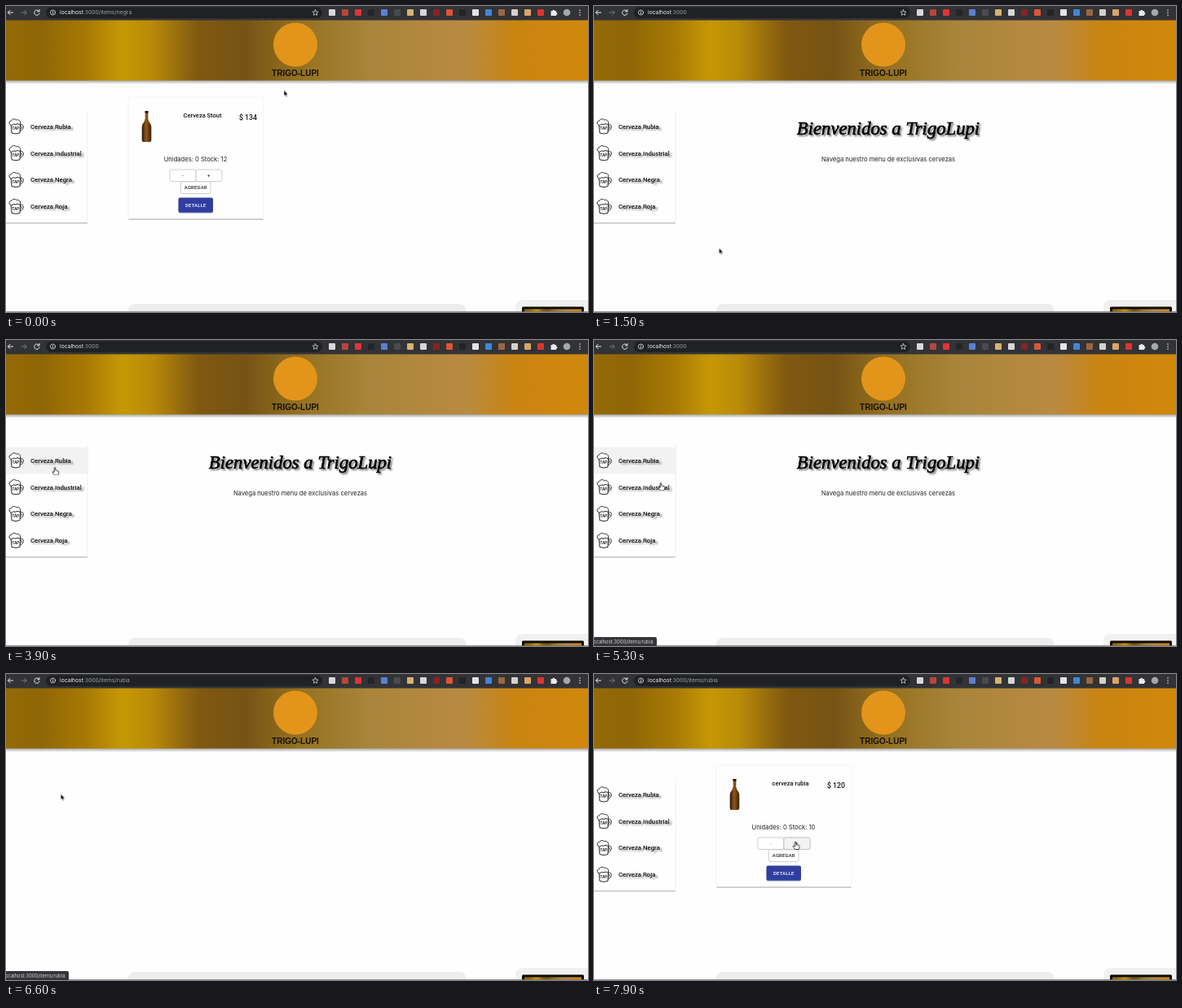
An HTML page that plays this animation: 714 by 376 pixels, repeating every 8 s.

```html
<!DOCTYPE html>
<html lang="es">
<head>
<meta charset="utf-8">
<title>TrigoLupi</title>
<style>
  html, body { margin: 0; width: 100%; height: 100%; overflow: hidden; background: #fefefe; }
  svg { display: block; width: 714px; height: 376px; }
  text { font-family: Inter, "Open Sans", sans-serif; font-size: 7.6px; fill: #222; }
  .mid { text-anchor: middle; }
  .url { font-size: 6.76px; fill: #9aa0a6; }
  .url .host { fill: #f1f3f4; }
  .item, .name, .price, .btn { font-family: Roboto, sans-serif; font-weight: 500; }
  .item { font-size: 7.75px; fill: #111; text-shadow: 3px 2px 2px rgba(0, 0, 0, .42); }
  .name { font-size: 7.5px; fill: #111; }
  .price { font-size: 8.7px; fill: #111; }
  .btn { font-size: 5.9px; letter-spacing: .2px; }
  .title {
    font: italic 22.7px "Liberation Serif", "Noto Serif", serif;
    fill: #000; stroke: #000; stroke-width: .7px;
    text-shadow: 2px 2px 2px rgba(0, 0, 0, .4);
  }
  .brand { font: bold 10px "Liberation Sans", sans-serif; fill: #17120a; }
  .status { font-size: 5.9px; fill: #cfd1d4; }
  .line { fill: none; stroke: #111; stroke-width: .9; stroke-linejoin: round; stroke-linecap: round; }
  .ui { fill: none; stroke: #e8eaed; stroke-width: 1; stroke-linecap: round; }
  .box { fill: #fff; stroke: #b9b9b9; stroke-width: .7; }

  .negra, .home, .rubia, .rubiaUrl, .menu, .hover, .statusBar, .plusHover, .arrow, .hand {
    animation: 8s step-end infinite;
  }
  .negra { animation-name: negra; }
  .home { animation-name: home; }
  .rubia { animation-name: rubia; }
  .rubiaUrl { animation-name: rubiaUrl; }
  .menu { animation-name: menu; }
  .hover { animation-name: hover; }
  .statusBar { animation-name: status; }
  .plusHover { animation-name: plusHover; }
  .arrow { animation-name: arrow; }
  .hand { animation-name: hand; }
  .cursor { animation: move 8s ease-in-out infinite; }

  @keyframes negra { 0% { opacity: 1 } 6.25%, 100% { opacity: 0 } }
  @keyframes home { 0% { opacity: 0 } 6.25% { opacity: 1 } 80%, 100% { opacity: 0 } }
  @keyframes rubia { 0% { opacity: 0 } 86.25%, 100% { opacity: 1 } }
  @keyframes rubiaUrl { 0% { opacity: 0 } 80%, 100% { opacity: 1 } }
  @keyframes menu { 0% { opacity: 1 } 80% { opacity: 0 } 86.25%, 100% { opacity: 1 } }
  @keyframes hover { 0% { opacity: 0 } 32.5% { opacity: 1 } 80%, 100% { opacity: 0 } }
  @keyframes status { 0% { opacity: 0 } 62.5% { opacity: 1 } 91.25%, 100% { opacity: 0 } }
  @keyframes plusHover { 0% { opacity: 0 } 95%, 100% { opacity: 1 } }
  @keyframes hand {
    0% { opacity: 0 } 4% { opacity: 1 } 7.5% { opacity: 0 } 32% { opacity: 1 }
    80% { opacity: 0 } 95%, 100% { opacity: 1 }
  }
  @keyframes arrow {
    0% { opacity: 1 } 4% { opacity: 0 } 7.5% { opacity: 1 } 32% { opacity: 0 }
    80% { opacity: 1 } 95%, 100% { opacity: 0 }
  }
  @keyframes move {
    0% { transform: translate(341px, 103.5px) }
    5%, 6.5% { transform: translate(350px, 62px) }
    16%, 24% { transform: translate(153.5px, 297.5px) }
    32.5%, 62.5% { transform: translate(60px, 156.5px) }
    66%, 68% { transform: translate(82px, 175.5px) }
    74%, 86.25% { transform: translate(67.3px, 147.5px) }
    96%, 100% { transform: translate(247.3px, 206px) }
  }
</style>
</head>
<body>
<svg viewBox="0 0 714 376">
  <defs>
    <linearGradient id="gold">
      <stop offset="0" stop-color="#946a06"/>
      <stop offset=".06" stop-color="#8f6606"/>
      <stop offset=".14" stop-color="#a87a04"/>
      <stop offset=".2" stop-color="#c69805"/>
      <stop offset=".25" stop-color="#b98a08"/>
      <stop offset=".33" stop-color="#80590f"/>
      <stop offset=".41" stop-color="#765315"/>
      <stop offset=".5" stop-color="#94701f"/>
      <stop offset=".62" stop-color="#a8843a"/>
      <stop offset=".79" stop-color="#b98a42"/>
      <stop offset=".87" stop-color="#c98412"/>
      <stop offset="1" stop-color="#d1880a"/>
    </linearGradient>
    <linearGradient id="drop" x2="0" y2="1">
      <stop offset="0" stop-color="#000" stop-opacity=".38"/>
      <stop offset="1" stop-color="#000" stop-opacity="0"/>
    </linearGradient>
    <linearGradient id="glass">
      <stop offset="0" stop-color="#2c1606"/>
      <stop offset=".45" stop-color="#94591a"/>
      <stop offset="1" stop-color="#3a1d08"/>
    </linearGradient>
    <g id="mug" class="line">
      <path fill="#fff" d="M-6-3L-5 8Q0 10 5 8L5.500-3Z"/>
      <path d="M5.500-2C10.500-4 11 4 5.300 5.500M5.500 0C8-1 8 3 5.300 3.300"/>
      <path fill="#fff" d="M-6-1.500C-9-3-8.500-7-5.500-6.800C-4.500-9.500-1-9.800 .5-8C3.500-9 6.500-6.500 5.500-3C4-1.500 3-4 1-3C0-1-2-4-3.500-2.500Z"/>
    </g>
  </defs>

  <!-- page foot -->
  <path fill="#ededed" d="M150 376v-4q2-6 9-6h396q8 0 9 6v4z"/>
  <path fill="#f1f1f1" d="M625 376v-8q2-7 9-7h80v15z"/>
  <rect x="633" y="369.500" width="76" height="8" rx="1.500" fill="#0d0b08"/>
  <rect x="636" y="372.500" width="70" height="4" fill="url(#gold)"/>
  <path d="M0 375.600H714" stroke="#777" stroke-width=".8"/>

  <!-- header -->
  <rect y="91" width="714" height="5" fill="url(#drop)"/>
  <rect y="17" width="714" height="74.500" fill="url(#gold)"/>
  <circle cx="355" cy="47.500" r="27" fill="#e2951a"/>
  <text class="brand mid" x="355" y="85.500">TRIGO-LUPI</text>

  <!-- browser bar -->
  <rect width="714" height="17.500" fill="#323336"/>
  <rect x="49" y="1.500" width="339" height="13.500" rx="6.750" fill="#202124"/>
  <g class="ui">
    <path d="M8.500 8H2.500M5 5.300L2.300 8L5 10.700"/>
    <path d="M19 8h6M22.500 5.300L25.200 8L22.500 10.700" stroke="#77797d"/>
    <path d="M40.300 6A3.200 3.200 0 1 0 41 9M41 4.500V6.800H38.600"/>
    <circle cx="57.500" cy="8" r="3" stroke-width=".8"/>
    <path d="M57.500 7.800V9.600M57.500 6.300V6.400" stroke-width=".8"/>
    <path d="M379.500 4.600l1 2.300 2.500.2-1.900 1.700.6 2.500-2.200-1.300-2.200 1.300.6-2.500-1.900-1.700 2.500-.2z" stroke-width=".7"/>
  </g>
  <g id="tools"></g>
  <path fill="#e8eaed" d="M668.500 6h2a1.300 1.300 0 1 1 2.600 0h2v2a1.300 1.300 0 1 1 0 2.600v1.400h-6.600z"/>
  <circle cx="688" cy="8" r="4.300" fill="#a5a7aa"/>
  <g fill="#e8eaed"><circle cx="704" cy="5" r=".8"/><circle cx="704" cy="8" r=".8"/><circle cx="704" cy="11" r=".8"/></g>
  <g id="urls"></g>

  <g id="menu" class="menu">
    <rect y="127" width="100" height="139.500" fill="#fefefe"/>
    <path d="M100.200 128V266" stroke="#ececec" stroke-width=".8"/>
    <path d="M0 266.800H100" stroke="#a9a9a9"/>
    <rect class="hover" y="132" width="100.500" height="32.500" fill="#f2f2f2"/>
  </g>

  <g class="home">
    <text class="title mid" x="361" y="158">Bienvenidos a TrigoLupi</text>
    <text class="mid" x="361" y="190.700">Navega nuestro menu de exclusivas cervezas</text>
  </g>

  <g id="cards"></g>

  <g class="statusBar">
    <path fill="#35363a" d="M0 365H75q2 0 2 2V376H0z"/>
    <text class="status" x="-2.500" y="372.600">localhost:3000/items/rubia</text>
  </g>

  <g class="cursor">
    <path class="arrow" d="M0 0V7L1.600 5.600L2.700 8.200L3.900 7.700L2.800 5.200H4.900Z" fill="#000" stroke="#fff" stroke-width=".5"/>
    <path class="hand" d="M-.8.6Q0-.4.8.6V3.600L4.200 4.500Q5 5 4.700 6.500L4 9.500H-.6L-3 6Q-3 4.600-1.600 5.300L-.8 6Z" fill="#fff" stroke="#111" stroke-width=".8" stroke-linejoin="round"/>
  </g>
</svg>
<script>
  const add = (id, html) => document.getElementById(id).insertAdjacentHTML('beforeend', html);

  const toolColors = ['#d9d9d9', '#b4473a', '#df3434', '#242528', '#5c7fd2', '#4a4b4e', '#d8b270', '#d6d6d6', '#862424',
    '#de5436', '#232427', '#e4e4e4', '#4585d6', '#9c6640', '#d4d2c8', '#dca468', '#dd3531'];
  toolColors.forEach((color, i) =>
    add('tools', `<rect x="${396 + i * 16}" y="4" width="8" height="8" rx="1" fill="${color}"/>`));

  const url = (cls, path) =>
    `<text class="url ${cls}" x="66" y="10.400"><tspan class="host">localhost</tspan>:3000${path}</text>`;
  add('urls', url('negra', '/items/negra') + url('home', '') + url('rubiaUrl', '/items/rubia'));

  ['Rubia', 'Industrial', 'Negra', 'Roja'].forEach((kind, i) => {
    const y = 148 + i * 32.8;
    add('menu', `<use href="#mug" x="12" y="${y}"/>
      <text class="mid" x="11.800" y="${y + 4.3}" style="font-size:4.500px;font-weight:700">TAP</text>
      <text class="item" x="30" y="${y + 2.8}">Cerveza ${kind}</text>`);
  });

  const card = (cls, name, price, stock, minus, extra = '') => `<g class="${cls}">
    <rect x="150" y="112" width="166" height="150" rx="2" fill="#fefefe" stroke="#f3f3f3" stroke-width=".8"/>
    <path d="M150.500 262H315.500" stroke="#a6a6a6"/>
    <path fill="url(#glass)" d="M170.700 129.500h3.600v9q.4 3 3 6.500 1 1.500 1 4v15.500q0 2.500-2 2.500h-7.600q-2 0-2-2.500V149q0-2.500 1-4 2.600-3.500 3-6.500z"/>
    <rect x="170.500" y="129" width="4" height="2.500" fill="#20140b"/>
    <text class="name mid" x="241" y="137.300">${name}</text>
    <text class="price" x="286" y="139.700">$ ${price}</text>
    <text class="mid" x="232.500" y="190.800">Unidades: 0 Stock: ${stock}</text>
    <rect class="box" x="201" y="201" width="32" height="14.500" rx="2"/>
    <rect class="box" x="233" y="201" width="32" height="14.500" rx="2"/>
    ${extra}
    <text class="btn mid" x="216.700" y="210.200" style="fill:${minus}">-</text>
    <text class="btn mid" x="248.700" y="210.200">+</text>
    <rect class="box" x="214.500" y="215.800" width="36.500" height="14.700" rx="2"/>
    <text class="btn mid" x="232.800" y="225.200">AGREGAR</text>
    <rect x="211.500" y="236.500" width="42.500" height="18.500" rx="2" fill="#000" opacity=".22"/>
    <rect x="211.500" y="235.500" width="42.500" height="18.300" rx="2" fill="#303f9f"/>
    <text class="btn mid" x="232.800" y="246.900" style="fill:#fff">DETALLE</text>
  </g>`;
  const plusHover = '<rect class="box plusHover" x="233" y="201" width="32" height="14.500" rx="2" style="fill:#f3f3f3"/>';
  add('cards', card('negra', 'Cerveza Stout', 134, 12, '#222') + card('rubia', 'cerveza rubia', 120, 10, '#999', plusHover));
</script>
</body>
</html>
```
